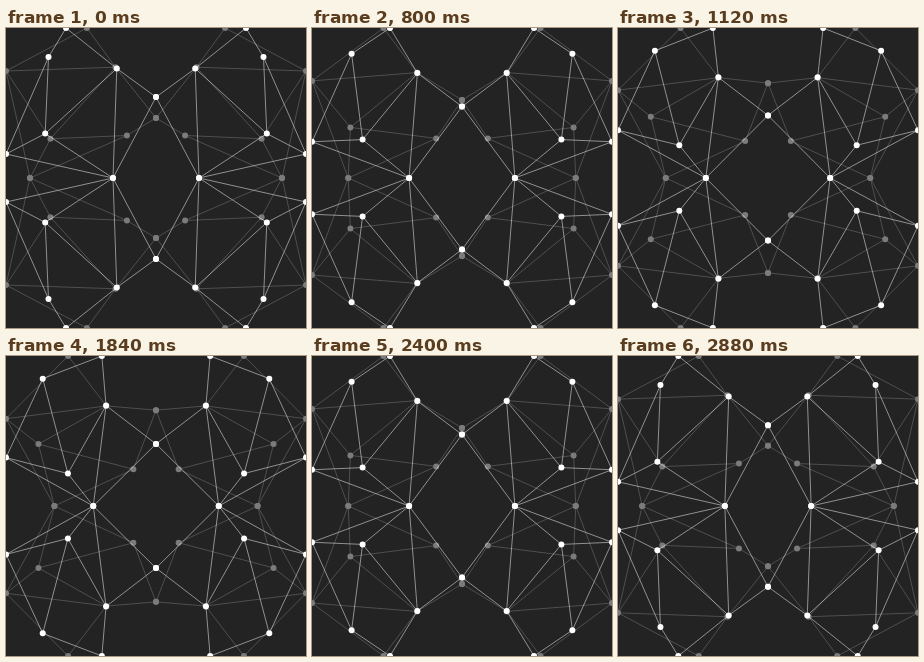
An HTML page that plays this animation: 300x300 px, repeating every 2960 ms.

```html
<!DOCTYPE html>
<html lang="en">
<head>
<meta charset="utf-8">
<title>Mirrored mesh</title>
<style>
html, body { margin: 0; width: 100%; height: 100%; overflow: hidden; background: #232323; }
svg { display: block; width: 100vw; height: 100vh; }
</style>
</head>
<body>
<svg id="stage" viewBox="0 0 300 300"></svg>
<script>
const NS = 'http://www.w3.org/2000/svg';
const LOOP = 2960, HALF = 1600, STEP = 80;

// Key points of one quarter: x, y and the distance each travels.
const points = [
  [60, 0, 36, 0], [42.5, 29.1, -5.8, -6.5], [110.8, 40.5, -10.8, 9.1], [150, 69.1, 0, 18.9],
  [39.2, 105.6, 22.8, 12], [0, 126, 0, -24.5], [107, 150, -19.8, 0]
];
const edges = '01 02 14 15 23 24 26 36 45 46 56'.split(' ');

const stage = document.getElementById('stage');

function add(parent, tag, attrs) {
  const el = document.createElementNS(NS, tag);
  for (const key in attrs) el.setAttribute(key, attrs[key]);
  return parent.appendChild(el);
}

const quarter = add(add(stage, 'defs', {}), 'g', { id: 'quarter' });
const path = add(quarter, 'path', { fill: 'none', stroke: '#fff', 'stroke-width': 0.5 });
const dots = points.map(() => add(quarter, 'circle', { r: 3, fill: '#fff' }));

// Four mirrored quarters; turn is applied to each quarter first.
function addMesh(opacity, turn) {
  const mesh = add(stage, 'g', { opacity });
  for (const sx of [1, -1]) for (const sy of [1, -1]) {
    add(mesh, 'use', {
      href: '#quarter',
      transform: `translate(150 150) scale(${sx} ${sy}) translate(-150 -150) ${turn}`
    });
  }
}

// The dim mesh is the bright one flipped across the quarter's diagonal.
addMesh(0.4, 'matrix(0 -1 -1 0 150 150)');
addMesh(1, '');

function easeInOutExpo(u) {
  if (u <= 0 || u >= 1) return u <= 0 ? 0 : 1;
  return u < 0.5 ? 2 ** (20 * u - 10) / 2 : 1 - 2 ** (10 - 20 * u) / 2;
}

function draw(time) {
  const t = Math.floor((time % LOOP) / STEP) * STEP;
  const k = easeInOutExpo(t < HALF ? t / HALF : 2 - t / HALF);
  const at = points.map(([x, y, dx, dy]) => [x + dx * k, y + dy * k]);
  path.setAttribute('d', edges.map(([a, b]) => `M${at[a]}L${at[b]}`).join(''));
  dots.forEach((dot, i) => {
    dot.setAttribute('cx', at[i][0]);
    dot.setAttribute('cy', at[i][1]);
  });
}

const start = performance.now();
function tick() {
  draw(performance.now() - start);
  requestAnimationFrame(tick);
}
draw(0);
requestAnimationFrame(tick);
</script>
</body>
</html>
```
